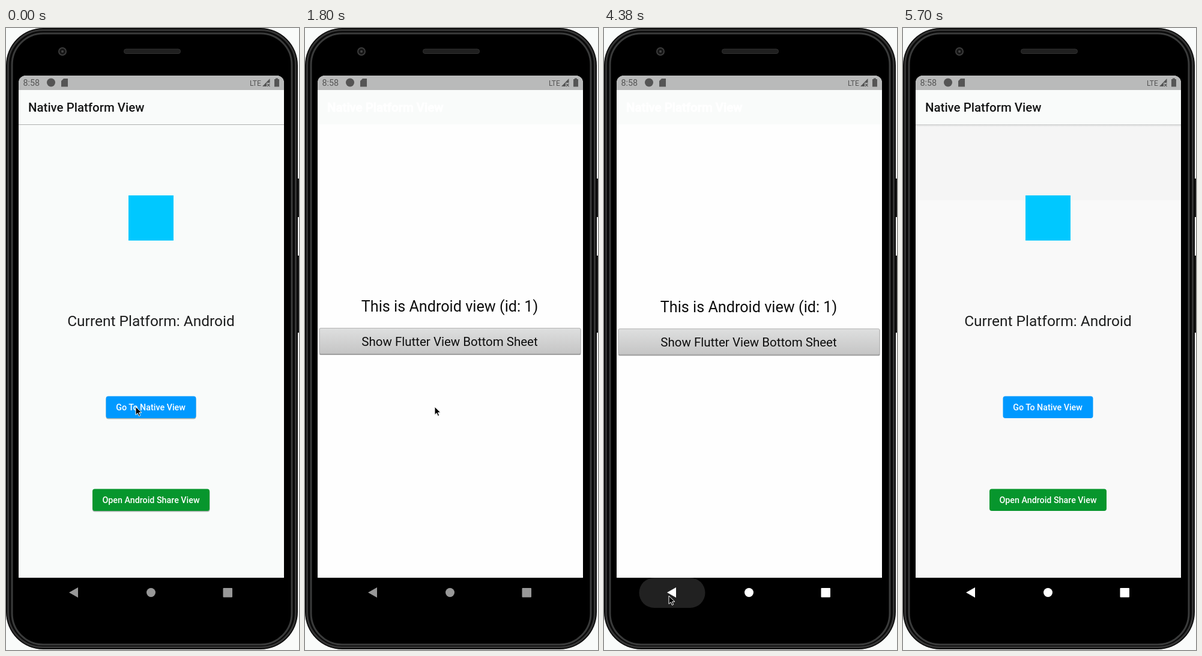
Write an HTML page that moves like this. It is 488 px wide and 1033 px high and loops after 6 s.

```html
<!DOCTYPE html>
<html lang="en">
<head>
<meta charset="utf-8">
<title>Native Platform View</title>
<style>
  html, body { margin: 0; width: 100%; height: 100%; overflow: hidden; background: #f9fbfa; }
  svg { display: block; width: 488px; height: 1033px; font-family: Roboto, sans-serif; }
  .medium { font-weight: 500; }
</style>
</head>
<body>
<svg viewBox="0 0 488 1033">
  <defs>
    <linearGradient id="silver" x2="0" y2="1">
      <stop stop-color="#dedfdf"/><stop offset="1" stop-color="#c5c5c5"/>
    </linearGradient>
    <linearGradient id="shade" x2="0" y2="1">
      <stop stop-color="#c4c5c5"/><stop offset="1" stop-color="#f5f5f5" stop-opacity="0"/>
    </linearGradient>
    <clipPath id="screen"><path d="M21 913V91a12 12 0 0 1 12-12H451a12 12 0 0 1 12 12V913Z"/></clipPath>
    <clipPath id="cover"><rect id="coverBox" x="21" y="103" width="442" height="810"/></clipPath>
    <clipPath id="blueShape"><rect x="166.500" y="611.500" width="150" height="36.500" rx="4"/></clipPath>
  </defs>

  <g id="phone">
    <path d="M484 250h4v64h-4zM484 378h4v128h-4z" fill="#151515"/>
    <rect x="0" y="0" width="486" height="1032" rx="62" fill="#090909"/>
    <rect x="3.500" y="3.500" width="479" height="1025" rx="58" fill="none" stroke="#343434" stroke-width="3"/>
    <rect x="10" y="9" width="466" height="1015" rx="52" fill="#000" stroke="#3a3b3b" stroke-width="3"/>
    <rect x="13" y="11" width="460" height="1011" rx="50" fill="#000"/>
    <circle cx="94" cy="39" r="6" fill="#151515" stroke="#3b3b3b" stroke-width="2"/>
    <circle cx="94" cy="39" r="2" fill="#444"/>
    <rect x="196.500" y="35" width="94" height="7.500" rx="3.500" fill="#202020" stroke="#303030"/>
  </g>

  <g clip-path="url(#screen)">
    <g id="home">
      <rect id="homeBg" x="21" y="79" width="442" height="834"/>
      <rect id="homeStrip" x="21" y="161" width="442" height="125" fill="#f5f5f5"/>
      <rect x="21" y="103" width="442" height="57" fill="#f9fbfa"/>
      <rect id="sharpLine" x="21" y="160" width="442" height="1" fill="#aeb0af"/>
      <rect id="softLine" x="21" y="160" width="442" height="5" fill="url(#shade)"/>
      <text x="37" y="139" font-size="20.45" class="medium" fill="#151616">Native Platform View</text>
      <rect x="204" y="278" width="75" height="75" fill="#00c8ff"/>
      <text x="241.500" y="494.500" font-size="24.500" text-anchor="middle" fill="#1d1e1e">Current Platform: Android</text>
      <g id="buttonShadows" fill="#a9b3af">
        <rect x="166.500" y="613" width="150" height="36.500" rx="4"/>
        <rect x="144" y="767" width="195.500" height="36.500" rx="4"/>
      </g>
      <rect x="166.500" y="611.500" width="150" height="36.500" rx="4" fill="#0099ff"/>
      <circle id="buttonRipple" cx="216.500" cy="630" fill="#fff" clip-path="url(#blueShape)"/>
      <rect x="144" y="765.500" width="195" height="36.500" rx="4" fill="#07962d"/>
      <g font-size="14.300" class="medium" fill="#fff" text-anchor="middle">
        <text x="241" y="635">Go To Native View</text>
        <text x="241.500" y="789">Open Android Share View</text>
      </g>
    </g>

    <g id="native" clip-path="url(#cover)">
      <rect x="21" y="103" width="442" height="57" fill="#f9fbfa"/>
      <text x="37" y="139" font-size="20.450" class="medium" fill="#fff" stroke="#fff">Native Platform View</text>
      <rect x="21" y="160" width="442" height="753" fill="#fefefe"/>
      <g id="nativeBody" text-anchor="middle" fill="#0d0d0d">
        <text x="241" y="471" font-size="25.200">This is Android view (id: 1)</text>
        <rect x="24" y="499" width="435.500" height="44" rx="2" fill="#999"/>
        <rect x="24" y="498.500" width="435" height="42.500" rx="2" fill="url(#silver)" stroke="#b4b4b4"/>
        <text x="241" y="527.500" font-size="20.500">Show Flutter View Bottom Sheet</text>
      </g>
    </g>

    <g id="statusBar" fill="#555">
      <rect x="21" y="79" width="442" height="24" fill="#b9baba"/>
      <text x="28.500" y="96" font-size="14.300">8:58</text>
      <circle cx="75" cy="90.500" r="7"/>
      <path d="M96 84h7v13.500H92V88Z"/>
      <text x="406" y="95.500" font-size="12" textLength="">LTE</text>
      <path d="M439.500 84V91H434V97H427Z"/>
      <path d="M435 92.500l4.500 4.500m0-4.500l-4.500 4.500" stroke="#555" stroke-width="1.300"/>
      <path d="M449 83.500h4V85h2V97.500h-8V85h2Z"/>
    </g>
  </g>

  <rect id="navRipple" y="913" height="50" rx="25" fill="#fff"/>
  <g id="navIcons">
    <path d="M105 937.500L120 929V946Z"/>
    <circle cx="241.500" cy="937.500" r="7.500"/>
    <rect x="361.500" y="930" width="15.500" height="15.500" rx="1"/>
  </g>
  <path id="cursor" d="M0 0V13.500L3.300 10.600 5.400 15.500 7.700 14.500 5.600 9.800H10Z" fill="#000" stroke="#fff"/>
</svg>

<script>
const LOOP = 6000, STEP = 60, RISE = 208;
const el = id => document.getElementById(id);
const set = (id, attrs) => {
  for (const name in attrs) el(id).setAttribute(name, attrs[name]);
};
const show = (id, visible) => set(id, { visibility: visible ? "visible" : "hidden" });
const clamp = v => Math.min(1, Math.max(0, v));
const progress = (t, from, to) => clamp((t - from) / (to - from));

// Cubic curve (0.4, 0, 0.2, 1), solved by bisection.
function fastOutSlowIn(x) {
  let low = 0, high = 1;
  for (let i = 0; i < 24; i++) {
    const s = (low + high) / 2, r = 1 - s;
    if (1.2 * r * r * s + 0.6 * r * s * s + s * s * s < x) low = s;
    else high = s;
  }
  return low * low * (3 - 2 * low);
}

// Time, x, y of the pointer tip.
const pointerPath = [
  [0, 216, 629], [3060, 216, 629], [3120, 182, 710], [3180, 152, 786],
  [3240, 142, 845], [3300, 154, 885], [3360, 168, 907], [3480, 168, 907],
  [3600, 140, 923], [3780, 108, 943], [5460, 108, 943], [5520, 107, 953],
  [5640, 98, 1015], [5700, 97, 1045], [6000, 97, 1045]
];

function pointerAt(t) {
  const i = pointerPath.findIndex(p => p[0] > t);
  const [t0, x0, y0] = pointerPath[i - 1], [t1, x1, y1] = pointerPath[i];
  const k = progress(t, t0, t1);
  return [x0 + (x1 - x0) * k, y0 + (y1 - y0) * k];
}

function nativeOffset(t) {
  const open = t < 3000 ? progress(t, 1453, 1753) : 1 - progress(t, 4354, 4618);
  return RISE * (1 - fastOutSlowIn(open));
}

function drawHome(t) {
  const returned = t >= 4320;
  set("homeBg", { fill: returned ? "#f9f9f9" : "#f9fbfa" });
  show("homeStrip", returned);
  show("softLine", returned);
  show("sharpLine", !returned);
  show("buttonShadows", !returned);
  const radius = t < 120 ? 14 : t < 840 ? 22 : 22 + 85 * progress(t, 780, 900);
  const fade = 1 - progress(t, 1200, 1500);
  set("buttonRipple", { r: radius, opacity: t < 60 ? 0 : 0.14 * fade });
}

function drawNative(t) {
  const offset = nativeOffset(t);
  const top = Math.max(103, 79 + offset);
  show("native", t >= 1380 && t < 4680);
  set("coverBox", { y: top, height: 913 - top });
  set("nativeBody", { transform: `translate(0 ${offset})` });
}

function drawNavigation(t) {
  const width = 50 + 60 * progress(t, 3960, 4200);
  const alpha = 0.13 * progress(t, 3960, 4140) * (1 - progress(t, 4380, 4590));
  set("navRipple", { x: 113.5 - width / 2, width, opacity: alpha });
  set("navIcons", { fill: t < 4320 ? "#989898" : "#fff" });
}

function render(time) {
  const t = Math.floor((time % LOOP) / STEP) * STEP;
  drawHome(t);
  drawNative(t);
  drawNavigation(t);
  set("cursor", { transform: `translate(${pointerAt(t)})` });
  show("cursor", t < 5700);
}

const start = performance.now();
function tick() {
  render(performance.now() - start);
  requestAnimationFrame(tick);
}
render(0);
requestAnimationFrame(tick);
</script>
</body>
</html>
```
